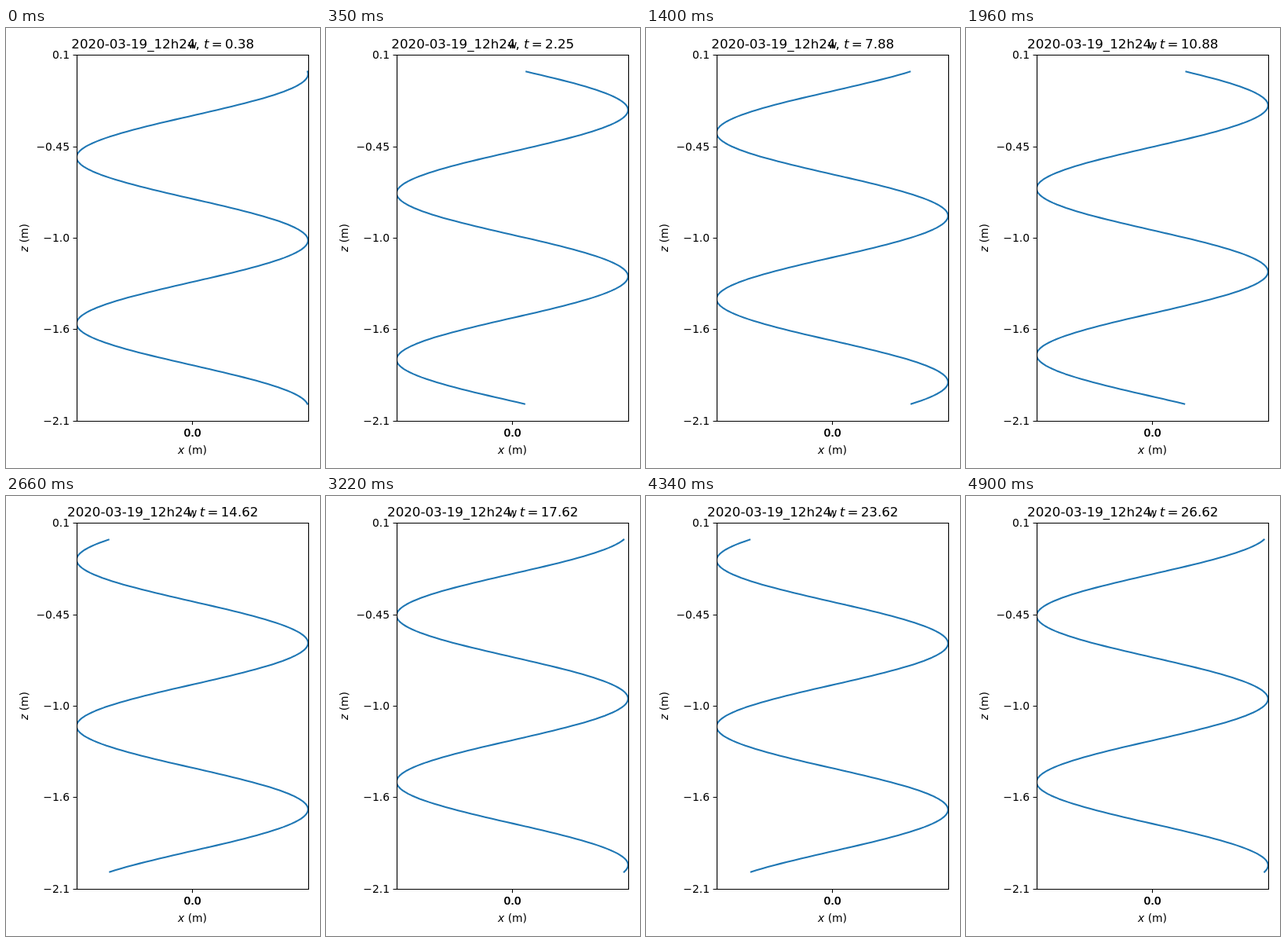
Recreate the animation shown at these times as an HTML page. Size 400x560 px, loop 4.97 s.

```html
<!DOCTYPE html>
<html>
<head>
<meta charset="utf-8">
<style>
  html, body { margin: 0; width: 100%; height: 100%; overflow: hidden; background: #fff; }
  svg { display: block; }
  text { font: 13.89px "DejaVu Sans", sans-serif; text-anchor: middle; }
  .title { font-size: 16.67px; }
  .ticks text { text-anchor: end; }
  .axes { fill: none; stroke: #000; stroke-width: 1.11; }
  .wave { fill: none; stroke: #1f77b4; stroke-width: 2.08; stroke-linecap: square; stroke-linejoin: round; }
  .i { font-style: italic; }
</style>
</head>
<body>
<svg width="400" height="560" viewBox="0 0 400 560">
  <clipPath id="plot"><rect x="90" y="34" width="295" height="466"/></clipPath>
  <path class="wave" id="wave" clip-path="url(#plot)"/>
  <path class="axes" d="M90.5 34.5H385.5V500.5H90.5ZM237.5 500v5M90 34.5h-4.5M90 151.5h-4.5M90 267.5h-4.5M90 383.5h-4.5M90 500.5h-4.5"/>
  <g class="ticks">
    <text x="81" y="39">0.1</text>
    <text x="81" y="156">−0.45</text>
    <text x="81" y="272">−1.0</text>
    <text x="81" y="388">−1.6</text>
    <text x="81" y="505">−2.1</text>
  </g>
  <text x="237.2" y="520">0.0</text>
  <text x="237.9" y="520">0.0</text>
  <text x="237.5" y="542"><tspan class="i">x</tspan> (m)</text>
  <text transform="translate(28 267) rotate(-90)"><tspan class="i">z</tspan> (m)</text>
  <text x="237.6" y="26.2">w</text>
  <text class="title" x="199.75" y="26">2020-03-19_12h24, <tspan class="i">t</tspan><tspan dx="3.25">=</tspan><tspan dx="3.25" id="clock"></tspan></text>
</svg>
<script>
const FRAME_MS = 70, FRAMES = 71, DT = 0.375;
const wave = document.getElementById('wave');
const clock = document.getElementById('clock');
let shown = -1;

// Two decimals, ties to even (times are multiples of 1/8)
function format(t) {
  const v = t * 100, low = Math.floor(v);
  const n = v - low === 0.5 ? low + low % 2 : Math.round(v);
  return (n / 100).toFixed(2);
}

function draw(t) {
  // Steady phase speed after a short start-up lag
  const phase = 0.6992 * t - 0.033 - 0.15 * Math.exp(-t / 4.5);
  const points = [];
  for (let i = 0; i <= 200; i++) {
    const depth = i / 100;
    const x = 237.35 + 147.5 * Math.cos(phase - 6.275 * depth);
    points.push(x.toFixed(2) + ' ' + (55.55 + 211.45 * depth).toFixed(2));
  }
  wave.setAttribute('d', 'M' + points.join('L'));
  clock.textContent = format(t);
}

function tick() {
  const step = Math.floor(performance.now() / FRAME_MS) % FRAMES;
  if (step !== shown) draw((step + 1) * DT);
  shown = step;
  requestAnimationFrame(tick);
}
tick();
</script>
</body>
</html>
```
